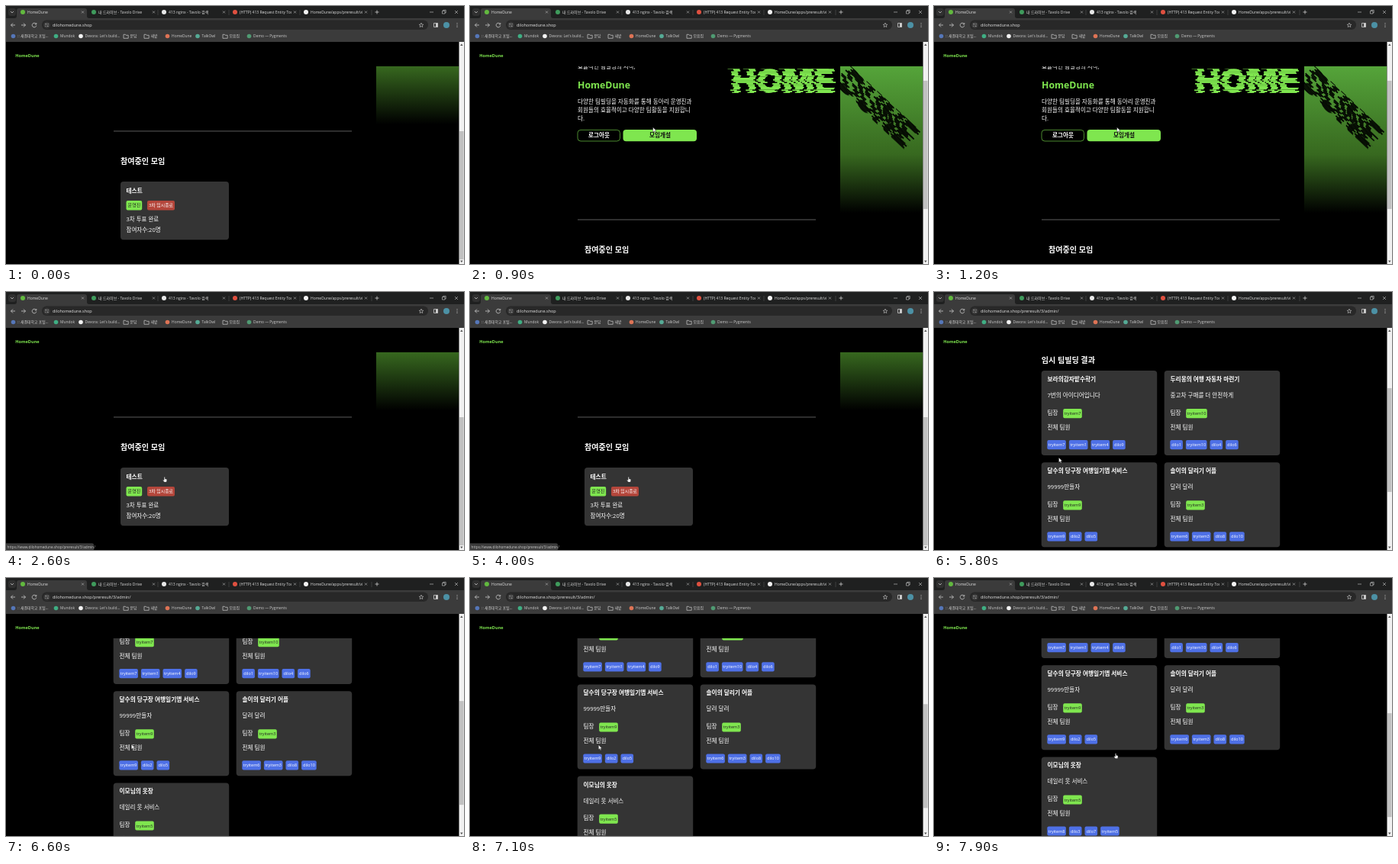
These frames come from a looping animation (600 by 338 pixels, 8 s). An HTML page:

```html
<!DOCTYPE html>
<html lang="ko">
<head>
<meta charset="utf-8">
<title>HomeDune</title>
<style>
html, body { margin: 0; width: 100%; height: 100%; overflow: hidden; background: #000; }
svg { display: block; }
text { font-family: "Open Sans", "Noto Sans CJK KR", "Noto Sans CJK", sans-serif; white-space: pre; }
.art { font: 900 44px Inter, sans-serif; }
</style>
</head>
<body>
<svg id="stage" width="600" height="338" viewBox="0 0 600 338"></svg>
<script>
const GREEN = '#7fe64f', CARD = '#343434', BAR = '#3b3b3b';

const text = (x, y, s, size = 7.6, fill = '#fff', more = '') =>
  `<text x="${x}" y="${y}" font-size="${size}" fill="${fill}" ${more}>${s}</text>`;
const bold = (x, y, s, size, fill, more = '') => text(x, y, s, size, fill, 'font-weight="700" ' + more);
const box = (x, y, w, h, fill, r = 0, more = '') =>
  `<rect x="${x}" y="${y}" width="${w}" height="${h}" rx="${r}" fill="${fill}" ${more}/>`;
const dot = (x, y, r, fill) => `<circle cx="${x}" cy="${y}" r="${r}" fill="${fill}"/>`;
const line = (d, stroke = '#ccc', w = .8) => `<path d="${d}" fill="none" stroke="${stroke}" stroke-width="${w}"/>`;
const clip = (x, y, w, h, body) =>
  `<svg x="${x}" y="${y}" width="${w}" height="${h}" viewBox="${x} ${y} ${w} ${h}">${body}</svg>`;
const middle = 'text-anchor="middle"';

// ---- browser frame
function tab(x, name, color) {
  return dot(x + 3, 8, 3, color) + clip(x + 9, 2, 68, 12, text(x + 9, 10, name, 5, '#ddd')) +
    line(`M${x + 80} 6.5l3 3m0-3l-3 3`, '#bbb', .6);
}

function bookmark(x, name, color) {
  const icon = color ? dot(x, 39.5, 2.8, color)
    : line(`M${x - 3} 37.3h2.4l.8 1h3v4h-6.2z`, '#ccc', .7);
  return icon + text(x + 5.6, 41.4, name, 4.9, '#ccc');
}

function chrome() {
  const tabs = [
    [19, 'HomeDune', '#62b93f'],
    [112, '내 드라이브 - Tavolo Drive', '#3f9b5c'],
    [204, '413 nginx - Tavolo 검색', '#e8e8e8'],
    [297, '(HTTP) 413 Request Entity Too', '#e0503f'],
    [390, 'HomeDune/apps/preresult/view', '#f2f2f2']];
  const marks = [
    [9.5, ':: 새결대학교 포털...', '#5576b8'], [65.5, 'Mundok', '#3fae83'],
    [98, 'Devora: Let\'s build...', '#f2f2f2'], [157, '문답'], [184, '새밭'],
    [211.5, 'HomeDune', '#dd7355'], [251, 'TalkOwl', '#55aa95'], [287, '모음집'],
    [318.5, 'Demo — Pygments', '#4f9a72']];
  return box(0, 0, 600, 16, '#1f2020') + box(0, 16, 600, 31, BAR) +
    box(3, 3, 10, 10, '#303030', 3) + line('M6 7l2 2 2-2') +
    `<path d="M11 16q3 0 3-3V6q0-3 3-3h86q3 0 3 3v7q0 3 3 3z" fill="${BAR}"/>` +
    tabs.map(a => tab(...a)).join('') +
    [199, 292, 385, 479].map(x => line(`M${x} 5v7`, '#555', .6)).join('') +
    line('M483.5 8h5m-2.5-2.5v5') +
    line('M555 8h5M571.5 6.5h3.5v3.5h-3.5zM572.7 6.5v-1.2h3.5v3.6h-1.2M588 6l4 4m0-4l-4 4', '#ccc', .6) +
    line('M12 25H6.5m2.5-2.5L6.5 25 9 27.5M20 25h5.5m-2.5-2.5l2.5 2.5-2.5 2.5M39.3 23.4a2.8 2.8 0 1 0 .5 2.2M39.8 22v2h-2') +
    box(47, 18.5, 506, 12.5, '#282828', 6) + dot(53.5, 25, 4.2, BAR) +
    line('M51.3 23.7h2m1.2 0h1.2M51.3 26.3h1m1.3 0h2', '#ddd', .7) +
    line('M544 22.2l.8 1.9 2 .2-1.5 1.3.5 2-1.8-1.1-1.8 1.1.5-2-1.5-1.3 2-.2z', '#ccc', .6) +
    line('M560.5 22.5h5v5h-5z') + box(563, 22.5, 2.8, 5, '#ccc') +
    dot(577, 25, 4, '#4c91a5') + [22.8, 25, 27.2].map(y => dot(591, y, .6, '#ccc')).join('') +
    marks.map(a => bookmark(...a)).join('');
}

// ---- home page, drawn as it stands at scroll 77
function glitch(word, fill, seed) {
  const rnd = () => (seed = seed * 16807 % 2147483647) / 2147483647;
  let out = '';
  for (let y = 0; y < 34; y += 1.7) {
    const dx = (rnd() - .5) * (rnd() < .35 ? 13 : 5);
    out += `<svg x="${dx.toFixed(1)}" y="${y}" width="160" height="1.9" viewBox="-8 ${y} 160 1.9">
      <text class="art" y="33" fill="${fill}">${word}</text></svg>`;
  }
  return out;
}

function home() {
  return `<defs><linearGradient id="fade" gradientUnits="userSpaceOnUse" x1="0" y1="2" x2="0" y2="271">
    <stop stop-color="#6bd049"/><stop offset=".286" stop-color="#55a43a"/>
    <stop offset=".717" stop-color="#37681f"/><stop offset="1" stop-color="#000"/></linearGradient></defs>` +
    text(141, 82, '효율적인 팀빌딩의 시작,') +
    bold(141, 107.5, 'HomeDune', 12.3, GREEN) +
    ['다양한 팀빌딩을 자동화를 통해 동아리 운영진과', '회원들의 효율적이고 다양한 팀활동을 지원합니', '다.']
      .map((s, i) => text(141, 128 + i * 10.8, s)).join('') +
    box(141, 162.4, 55.5, 14.6, '#000', 4, `stroke="${GREEN}" stroke-width=".6"`) +
    bold(169, 172.4, '로그아웃', 7.6, '#fff', middle) +
    box(200.5, 162, 96.5, 15.2, GREEN, 4) + bold(249, 172.4, '모임개설', 7.6, '#111', middle) +
    `<g transform="translate(334 80.5)">${glitch('HOME', GREEN, 71)}</g>` +
    box(485, 2, 108.5, 269, 'url(#fade)') +
    clip(485, 2, 108.5, 269, `<g transform="translate(540 139) rotate(43) translate(-78 -17)">${glitch('DUNE', '#050a03', 913)}</g>`) +
    box(141, 279, 312, 1.8, '#333') +
    bold(150, 323, '참여중인 모임', 10.1) +
    box(150, 346, 142, 76.3, CARD, 4) +
    bold(157.5, 361, '테스트', 7.7) +
    box(157.5, 371, 20.7, 12.4, GREEN, 2) + text(167.9, 379.4, '운영진', 6, '#222', middle) +
    box(185, 371, 36, 12.4, '#b4463b', 2) + text(203, 379.4, '3차 임시종료', 5.9, '#fff', middle) +
    text(157.5, 398, '3차 투표 완료', 7.5) + text(157.5, 411.7, '참여자수:20명', 7.5);
}

// ---- result page, drawn as it stands at scroll 153
const user = id => id[0] === 't' ? 'tryitem' + id.slice(1) : 'dilo' + id.slice(1);

function chip(x, y, id, fill, ink) {
  const w = (id[0] === 't' ? 24.6 : 16.6) + (id.length > 2 ? 3 : 0);
  return [box(x, y, w, 12.2, fill, 2) + text(x + w / 2, y + 8.1, user(id), 5.5, ink, middle), x + w + 4];
}

function team(i, title, idea, leader, members) {
  const x = 140.7 + i % 2 * 161, y = 103 + (i >> 1) * 120.2;
  let cx = x + 7.6;
  return box(x, y, 151.5, 111, CARD, 4) +
    bold(x + 7.8, y + 14, title, 7.7) + text(x + 7.8, y + 35, idea) +
    text(x + 7.8, y + 57.7, '팀장') + chip(x + 28.5, y + 50, leader, GREEN, '#222')[0] +
    text(x + 7.8, y + 76.7, '전체 팀원') +
    members.split(' ').map(id => {
      const [svg, next] = chip(cx, y + 91, id, '#4e70e6', '#fff');
      cx = next;
      return svg;
    }).join('');
}

function results() {
  return bold(140.7, 93, '임시 팀빌딩 결과', 10.1) + [
    ['보라의감자밭수확기', '7번의 아이디어입니다', 't7', 't7 t1 t4 d9'],
    ['두리몽의 여행 자동차 마련기', '중고차 구매를 더 안전하게', 't10', 'd1 t10 d4 d6'],
    ['달수의 당구장 여행일기앱 서비스', '99999만들자', 't9', 't9 d2 d5'],
    ['솔이의 달리기 어플', '달려 달려', 't3', 't6 t3 d8 d10'],
    ['이모님의 옷장', '데일리 옷 서비스', 't5', 't8 d3 d7 t5']
  ].map((a, i) => team(i, ...a)).join('');
}

const site = 'dilohomedune.shop', path = '/preresult/3/admin/';
const stage = document.getElementById('stage');
stage.innerHTML = box(0, 0, 600, 338, '#000') +
  clip(0, 79, 593.5, 259, `<g id="home">${home()}</g><g id="results">${results()}</g>`) +
  bold(12.3, 67, 'HomeDune', 5.6, GREEN) +
  box(593.5, 47, 6.5, 291, '#f1f1f1') +
  '<path d="M595 52l1.8-2.4 1.8 2.4zM595 333.5l1.8 2.4 1.8-2.4z" fill="#555"/>' +
  box(594, 54, 5.6, 100, '#c1c1c1', 0, 'id="thumb"') +
  chrome() + text(61, 27, site, 5.5, '#e4e4e4', 'id="address"') +
  `<g id="status">${box(-3, 329.3, 118, 12, BAR, 2)}${text(1.6, 335.6, 'https://www.' + site + path, 4.7, '#ccc')}</g>` +
  `<path id="arrow" d="M0 0v6.2l1.5-1.3 1 2.2 1-.5-1-2.1h2z" fill="#fff" stroke="#222" stroke-width=".4"/>
   <path id="hand" d="M-.6 0q.6-.7 1.2 0v2.3l2 .5q.6.2.5.9l-.5 2.9h-3l-1.9-2.6q.1-.9 1.7.1z" fill="#fff" stroke="#222" stroke-width=".4"/>`;

const part = Object.fromEntries([...stage.querySelectorAll('[id]')].map(e => [e.id, e]));
const show = (e, on) => e.setAttribute('visibility', on ? 'visible' : 'hidden');

// keys: [time, value...]; eased between neighbours
function at(keys, t) {
  const i = keys.findIndex(k => k[0] > t);
  if (i < 0) return keys.at(-1).slice(1);
  if (!i) return keys[0].slice(1);
  const a = keys[i - 1], b = keys[i], u = (t - a[0]) / (b[0] - a[0]), e = u * u * (3 - 2 * u);
  return a.slice(1).map((v, n) => v + (b[n + 1] - v) * e);
}

const homeScroll = [[200, 193], [800, 77], [1300, 77], [1800, 193]];
const resultScroll = [[6000, 153], [6600, 228], [6900, 228], [7500, 262]];
const pointer = [[300, 240, 190], [900, 239.7, 159], [1800, 239.7, 159], [2400, 207.7, 242.5],
  [4700, 207.7, 242.5], [5300, 163.5, 217], [6200, 163.5, 217], [6600, 164.3, 218],
  [7000, 164.3, 218], [7700, 238, 230]];

function draw() {
  const t = Math.floor(performance.now() % 8000 / 100) * 100;
  const loaded = t >= 5600;
  const [scroll] = at(loaded ? resultScroll : homeScroll, t);
  show(part.home, !loaded);
  show(part.results, loaded);
  part.home.setAttribute('transform', `translate(0 ${77 - scroll})`);
  part.results.setAttribute('transform', `translate(0 ${153 - scroll})`);
  part.thumb.setAttribute('y', 54 + scroll * (loaded ? .47 : .57));
  part.thumb.setAttribute('height', loaded ? 136 : 168);
  part.address.textContent = site + (loaded ? path : '');
  show(part.status, t >= 2400 && !loaded);

  const [x, y] = at(pointer, t);
  const hand = t >= 2300 && t < 5000 || t >= 7600;
  show(part.arrow, t >= 300 && !hand);
  show(part.hand, hand);
  for (const e of [part.arrow, part.hand]) e.setAttribute('transform', `translate(${x} ${y})`);
  requestAnimationFrame(draw);
}
draw();
</script>
</body>
</html>
```
